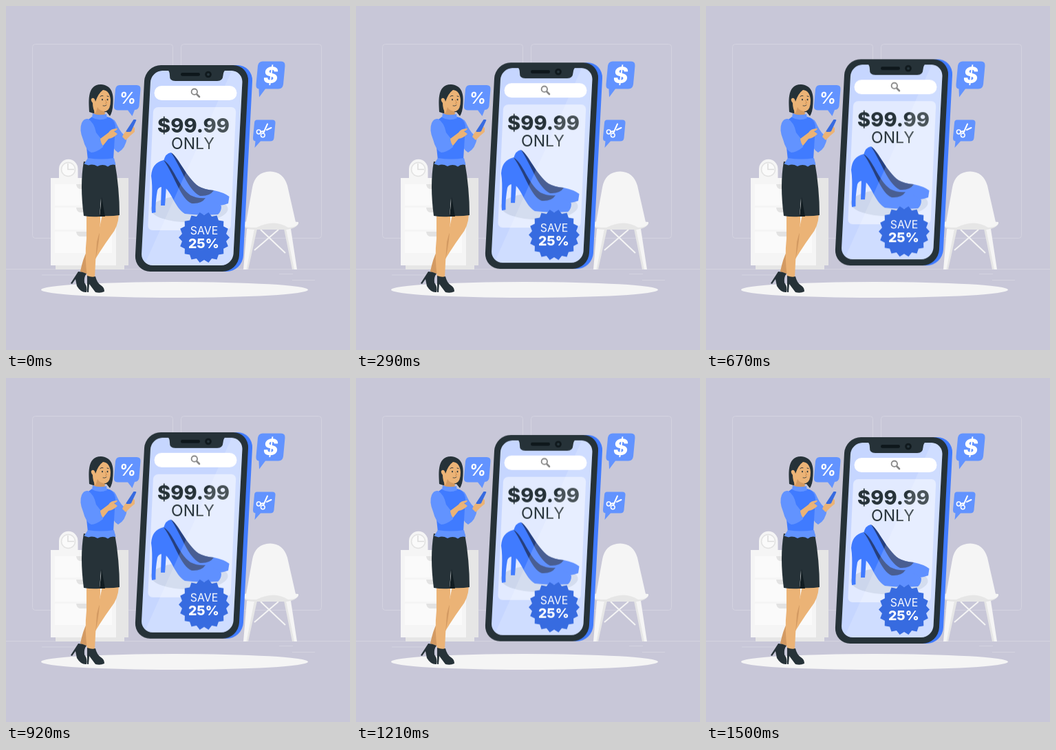
An HTML page that plays this animation: 500 px wide and 500 px high, repeating every 1.54 s.

```html
<!DOCTYPE html>
<html lang="en">
<head>
<meta charset="utf-8">
<title>Shoe sale</title>
<style>
  html, body { margin: 0; width: 100%; height: 100%; overflow: hidden; background: #c8c7d8; }
  svg { display: block; width: 100vw; height: 100vh; }
  text { font-family: Inter, "Open Sans", sans-serif; text-anchor: middle; }
  .dark { fill: #263238; }
  .pale { fill: #f5f5f5; }
  .grey { fill: #e6e6e6; }
  .blue { fill: #407bff; }
  .soft { fill: #6293ff; }
  .deep { fill: #376be0; }
  .navy { fill: #263f7d; }
  .skin { fill: #ebb376; }
  .tan { fill: #d39a62; }
  .line { fill: none; stroke: #d4d3e0; }
  .mark { fill: none; stroke: #fff; stroke-linecap: round; }
  #phone { animation: bob 1540ms linear infinite; }
  @keyframes bob {
    0% { transform: translateY(0); }
    19% { transform: translateY(-3.9px); }
    35% { transform: translateY(-7.2px); }
    43.5% { transform: translateY(-8.8px); }
    48% { transform: translateY(-9.1px); }
    52% { transform: translateY(-8.7px); }
    60% { transform: translateY(-7.2px); }
    70% { transform: translateY(-5.1px); }
    86.4% { transform: translateY(-1.8px); }
    97.4%, 100% { transform: translateY(0); }
  }
</style>
</head>
<body>
<svg viewBox="0 0 500 500">
  <defs>
    <clipPath id="glass">
      <rect width="133.500" height="283" rx="17" transform="translate(210.800 94) skewX(-2.950)"/>
    </clipPath>
  </defs>

  <!-- room -->
  <g class="line">
    <rect x="38.500" y="55.500" width="204" height="282" rx="4"/>
    <rect x="254.500" y="55.500" width="204" height="282" rx="4"/>
    <path d="M0 382.500H500M52 391H101M397 389.500H417M416 398.500H449"/>
  </g>
  <ellipse class="pale" cx="245" cy="412.500" rx="194" ry="11.500"/>

  <!-- cabinet and clock -->
  <path class="grey" d="M72 374H172V383H72ZM158 250H178V377H158Z"/>
  <path class="pale" d="M65 250H160V377H65Z"/>
  <path fill="#fafafa" d="M71 259H154V290H71ZM71 293H154V325H71ZM71 328H154V359H71Z"/>
  <path fill="#e3e3e3" d="M102 259H122V263Q121 266 117 266H108Q103 266 102 259ZM102 293H122V297Q121 300 117 300H108Q103 300 102 293ZM102 328H122V332Q121 335 117 335H108Q103 335 102 328Z"/>
  <path class="pale" d="M77 250V237A13.500 14 0 0 1 104.500 237V250Z"/>
  <circle cx="90.500" cy="237.500" r="10" fill="#fafafa" stroke="#e2e2e2" stroke-width="1.500"/>
  <path d="M90 229V237.500H99" fill="none" stroke="#dcdcdc" stroke-width="1.500"/>

  <!-- chair -->
  <path d="M370 325L406 359M396 325L361 355" fill="none" stroke="#f5f5f5" stroke-width="2"/>
  <path class="grey" d="M359 324H365L352 383H349ZM404 324H409L420 383H416Z"/>
  <path class="pale" d="M350 324H361L349.500 383H345ZM407 324H414L423 383H419Z"/>
  <path class="pale" d="M349 314L358 264Q362 241 384 240.500Q403 241 409 261L421 314Z"/>
  <path class="grey" d="M344 316Q384 309 425 316Q421 324 408 325H360Q346 325 344 316Z"/>
  <path class="pale" d="M343 314Q384 309 425 314Q426 321 410 322Q390 309 364 322Q343 323 343 314Z"/>

  <!-- big phone -->
  <g id="phone">
    <g transform="translate(202.200 86) skewX(-2.950)">
      <rect class="blue" x="7" width="150" height="300" rx="23"/>
      <rect class="dark" width="151" height="300" rx="23"/>
    </g>
    <g clip-path="url(#glass)">
      <path fill="#c6d6ff" d="M190 90H350V380H190Z"/>
      <rect width="120.300" height="179" rx="7" fill="#e2eaff" transform="translate(214.200 147) skewX(-2.600)"/>
      <ellipse cx="266.500" cy="295" rx="56" ry="19.500" fill="#ccd6ec"/>

      <!-- back shoe -->
      <path class="blue" d="M226 260L225 290H231L233 262Z"/>
      <path class="blue" d="M229 225Q232 214 239.500 213C250 219 261 248 279 262Q288 267 302 268Q317 271 324.500 277L323 287Q312 291 298 291L266 286L236 245Z"/>
      <path class="navy" d="M240 213C251 220 262 249 280 262Q289 267 302 268Q296 277 282 276C265 268 256 238 240 213Z"/>

      <!-- front shoe -->
      <path class="blue" d="M211 247Q212 228 229 224C242 233 250 276 290 280Q307 283 313 291Q313 299 308 303Q282 305 260 302C246 294 241 271 231 264Q223 261 220 268Q217 285 217.500 300L212 301C211 284 214 267 211 247Z"/>
      <path class="navy" d="M229 224C243 232 250 262 268 275Q278 280 290 279Q284 288 270 287C254 281 246 248 229 224Z"/>

      <text class="dark" x="272.500" y="184.500" font-size="29" font-weight="800">$99.99</text>
      <text class="dark" x="271.500" y="208.500" font-size="23" font-weight="420">ONLY</text>
      <path d="M328 94H360V390H195Z" fill="#fff" opacity=".16"/>
    </g>
    <path class="dark" d="M235 93H319Q316 95 315.500 101Q315 109 307 109H246Q237.500 109 238 101Q238 95 235 93Z"/>
    <rect x="254" y="97" width="28" height="4.800" rx="2.400" fill="#0e171b"/>
    <circle cx="294" cy="99.500" r="4.800" fill="#10191d"/>
    <circle cx="294" cy="99.500" r="2" fill="#27353c"/>
    <rect x="215.500" y="116" width="120" height="21" rx="10.500" fill="#fff"/>
    <g fill="none" stroke="#858585" stroke-linecap="round">
      <circle cx="273.800" cy="124.700" r="4.200" stroke-width="1.800"/>
      <path d="M277.500 128.500L281 132" stroke-width="2.600"/>
    </g>
    <path id="burst" class="deep"/>
    <text x="288" y="332" font-size="15.800" fill="#fff">SAVE</text>
    <text x="287.300" y="352.300" font-size="19.400" font-weight="800" fill="#fff">25%</text>
  </g>

  <!-- speech bubbles -->
  <g class="soft">
    <path d="M373 80.500H400Q406 80.500 405.500 87L403 114Q402 120.500 396 120.500H377L368 132.500L367.500 120.500Q363 120 363.500 114L366 87Q367 80.500 373 80.500Z"/>
    <path d="M365 165.500H387Q392 165.500 391.500 170L389.500 192Q389 196.500 384 196.500H370L361.500 206L362.500 196.500Q358.500 196 359 191L361 170Q361 165.500 365 165.500Z"/>
    <path d="M165 115H190Q196 115 195.500 121L193.500 145Q193 150.500 187 151L183.500 160L177 151.500H162Q156.500 151 157 145L159 121Q160 115 165 115Z"/>
  </g>
  <g fill="#fff">
    <text transform="translate(383.500 112) skewX(-8)" font-size="32.500" font-weight="800">$</text>
    <text transform="translate(176.500 141.500) skewX(-4)" font-size="23.500" font-weight="700">%</text>
  </g>
  <g class="mark" stroke-width="1.500">
    <circle cx="367.300" cy="183" r="2.900"/>
    <circle cx="373.300" cy="187.800" r="2.900"/>
    <path d="M370 183L374 182M374 185L380 171.500M379 180L385.500 177" stroke-width="2"/>
  </g>

  <!-- legs and boots -->
  <path class="skin" d="M140 303H164Q163 321 153 333Q137 355 117 389L108 386Q114 362 133 336Z"/>
  <path class="tan" d="M130 340Q134 334 136 330Q134 352 130 368L117 389L108 386Q112 366 118 356Z"/>
  <path class="skin" d="M117 303H137Q138 324 132 343Q130 368 129 395L118 394Q114 365 117 338Z"/>
  <path class="dark" d="M105 386Q111 386 117 389Q113 394 114 402Q119 409 117 416Q109 417 103 407L101 397L96 404L94 403Z"/>
  <path class="dark" d="M118 392Q125 395 130 393Q132 402 138 406Q143 409 143 415Q137 418 130 416L121 404L120 416H118Z"/>
  <path class="dark" d="M113 226Q135 232 158 226Q165 265 165 304Q152 306 140 305L138 280L136 306Q124 307 113 305Q107 260 113 226Z"/>
  <path d="M139 278L136 306H144Z" fill="#111c21"/>

  <!-- arms and torso -->
  <path class="soft" d="M149 162Q158 163 162 174Q167 185 176 191Q174 207 163 213Q154 208 150 190Z"/>
  <path class="skin" d="M169 190Q173 181 179 179L184 175Q188 176 187 181L180 189L174 195Z"/>
  <path class="blue" d="M125 161L147 161Q157 163 159 174L156 224H119L117 205Q109 188 113 170Z"/>
  <path class="soft" d="M119 221Q138 224 157 221L159.500 231Q153 229 148 233.500Q141 229 133 233Q126 229 120 231.500L113.500 229.500Z"/>
  <path class="soft" d="M119 164Q128 169 131 184L138 193Q142 199 141 205Q131 213 124 213Q116 210 112 194Q106 180 110 170Q113 163 119 164Z"/>
  <path class="skin" d="M137 193L149 184Q152 178 162 178Q161 181 157 182L162 186Q156 192 149 193L141 203Q138 200 137 193Z"/>
  <path class="deep" d="M185.500 165H188Q190 165 189 167L182 182Q181 183 179 183H175Q174 182 175 181Z"/>
  <path class="skin" d="M178 184Q184 183 187 177L187 183L181 188Z"/>

  <!-- head -->
  <path class="dark" d="M121 154C121 143 116 114 138 114C152 115 157 125 155.500 142Q155 154 151 160L146 154L127 156Z"/>
  <path class="tan" d="M129 142L143 149L144 159Q136 161 128 157Z"/>
  <path class="skin" d="M130 139Q134 127 141 122Q151 123 152 137Q152 151 145 153Q136 153 133 147L130 156Q126 150 126 141Q122 136 125 134Q129 133 130 139Z"/>
  <path class="soft" d="M126 156Q135 160 146 157L147 163Q135 168 125 162Z"/>
  <g fill="none" stroke="#263238" stroke-linecap="round">
    <path d="M137 131.500Q139 129.500 141 130.500M147 131L149 131.500" stroke-width=".9"/>
    <path d="M140 135.500V136.500M147.500 135.500V136.500" stroke-width="1.700"/>
    <path d="M141 145Q144 146 146 144" stroke-width=".8"/>
  </g>
  <path d="M144 136L146.500 141L144 141.500" fill="none" stroke="#c98547" stroke-width=".8"/>
</svg>
<script>
  const spikes = 18;
  const points = Array.from({ length: spikes * 2 }, (_, i) => {
    const r = i % 2 ? 32.5 : 37;
    const a = i * Math.PI / spikes;
    return [288 + r * Math.cos(a), 336.5 + r * Math.sin(a)].map(n => n.toFixed(1));
  });
  document.getElementById("burst").setAttribute("d", "M" + points.join("L") + "Z");
</script>
</body>
</html>
```
